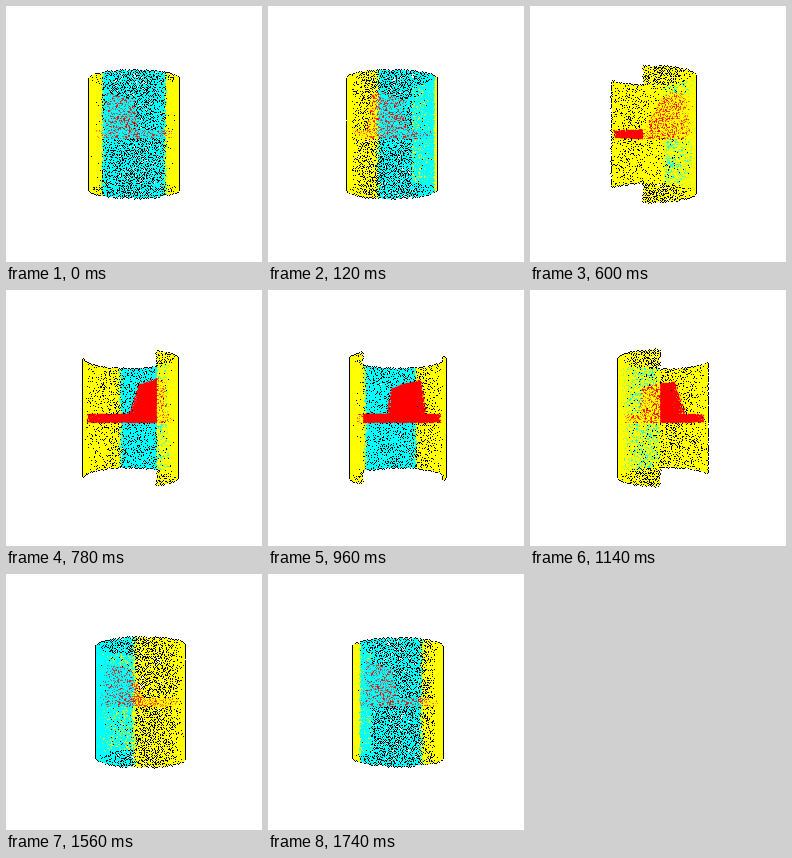
An HTML page with a canvas that plays this animation: 256 by 256 pixels, repeating every 1800 ms.

```html
<!DOCTYPE html>
<html lang="en">
<head>
<meta charset="utf-8">
<title>Rotating point cloud</title>
<style>
  html, body { margin: 0; width: 100%; height: 100%; overflow: hidden; background: #fff; }
  canvas { display: block; width: 100vw; height: 100vh; image-rendering: pixelated; }
</style>
</head>
<body>
<canvas id="stage" width="256" height="256"></canvas>
<script>
const SIZE = 256, STEPS = 30, STEP_MS = 60;
const CENTRE = 128, DISTANCE = 6, ZOOM = 273;
const YELLOW = [255, 255, 0], CYAN = [0, 255, 255], RED = [255, 0, 0];
const EDGE_BLEND = 0.18;
const NEIGHBOURS = [1, SIZE, -1, -SIZE];

const ctx = document.getElementById('stage').getContext('2d');
const image = ctx.createImageData(SIZE, SIZE);
const pixels = image.data;
const state = new Uint8Array(SIZE * SIZE); // 0 empty, 1 fringe, 2 covered

let seed = 20117;
function random() {
  seed = (seed + 0x6D2B79F5) | 0;
  let t = Math.imul(seed ^ (seed >>> 15), 1 | seed);
  t = (t + Math.imul(t ^ (t >>> 7), 61 | t)) ^ t;
  return ((t ^ (t >>> 14)) >>> 0) / 4294967296;
}
const between = (a, b) => a + (b - a) * random();
const lerp = (a, b, t) => a + (b - a) * t;
const rad = deg => deg * Math.PI / 180;

const points = [];
function add(x, y, z, color) {
  const side = Math.floor(random() * 4);
  points.push({ x, y, z, color, side, pixel: 0, depth: 0 });
}

// Open cylinder wall with a cyan stripe in the middle
function addShell(count) {
  for (let i = 0; i < count; i++) {
    const deg = between(-127, 127);
    const stripe = Math.abs(deg) < between(35.5, 41.5);
    add(Math.sin(rad(deg)), between(-1.227, 1.227), 0.96 * Math.cos(rad(deg)) - 0.19,
      stripe ? CYAN : YELLOW);
  }
}

// Flat round plate, cut off at the opening of the wall
function addPlate(count) {
  while (count > 0) {
    const r = 0.9 * Math.sqrt(random()), a = between(0, 2 * Math.PI);
    const z = r * Math.cos(a) - 0.19;
    if (z < -0.78) continue;
    add(r * Math.sin(a), between(-0.085, 0.085), z, RED);
    count--;
  }
}

// Tapered block standing on the plate
function addBlock(count) {
  for (let i = 0; i < count; i++) {
    const v = random();
    const z = between(lerp(-0.32, -0.03, Math.pow(v, 1.4)), 0.5);
    const x = between(lerp(-0.62, -0.57, v), lerp(0.02, -0.13, v) + 0.15 * Math.max(z, 0) / 0.5);
    const top = 0.74 + 0.11 * (-0.13 - x) / 0.42;
    add(x, -lerp(0.05, top, v), z, RED);
  }
}

addShell(28000);
addPlate(4000);
addBlock(6000);

function project(angle) {
  const c = Math.cos(angle), s = Math.sin(angle);
  for (const p of points) {
    p.depth = p.z * c - p.x * s;
    const k = ZOOM / (DISTANCE - p.depth);
    const px = Math.floor(CENTRE + k * (p.x * c + p.z * s));
    const py = Math.floor(CENTRE + 0.3 + k * p.y);
    p.pixel = py * SIZE + px;
  }
  points.sort((a, b) => a.depth - b.depth);
}

function setPixel(i, r, g, b) {
  pixels[4 * i] = r;
  pixels[4 * i + 1] = g;
  pixels[4 * i + 2] = b;
}

// Dark on empty ground, a faint tint on covered ground
function fringe(i, color) {
  if (state[i] === 0) {
    setPixel(i, 0, 0, 0);
    state[i] = 1;
  } else if (state[i] === 2) {
    for (let n = 0; n < 3; n++) {
      pixels[4 * i + n] = lerp(pixels[4 * i + n], color[n], EDGE_BLEND);
    }
  }
}

function splat(p) {
  setPixel(p.pixel, p.color[0], p.color[1], p.color[2]);
  state[p.pixel] = 2;
  fringe(p.pixel + NEIGHBOURS[p.side], p.color);
  fringe(p.pixel + NEIGHBOURS[(p.side + 1) % 4], p.color);
}

function draw(step) {
  pixels.fill(255);
  state.fill(0);
  project(step * 2 * Math.PI / STEPS);
  for (const p of points) splat(p);
  ctx.putImageData(image, 0, 0);
}

const start = performance.now();
let shown = -1;
function tick() {
  const step = Math.floor((performance.now() - start) / STEP_MS) % STEPS;
  if (step !== shown) {
    shown = step;
    draw(step);
  }
  requestAnimationFrame(tick);
}
tick();
</script>
</body>
</html>
```
